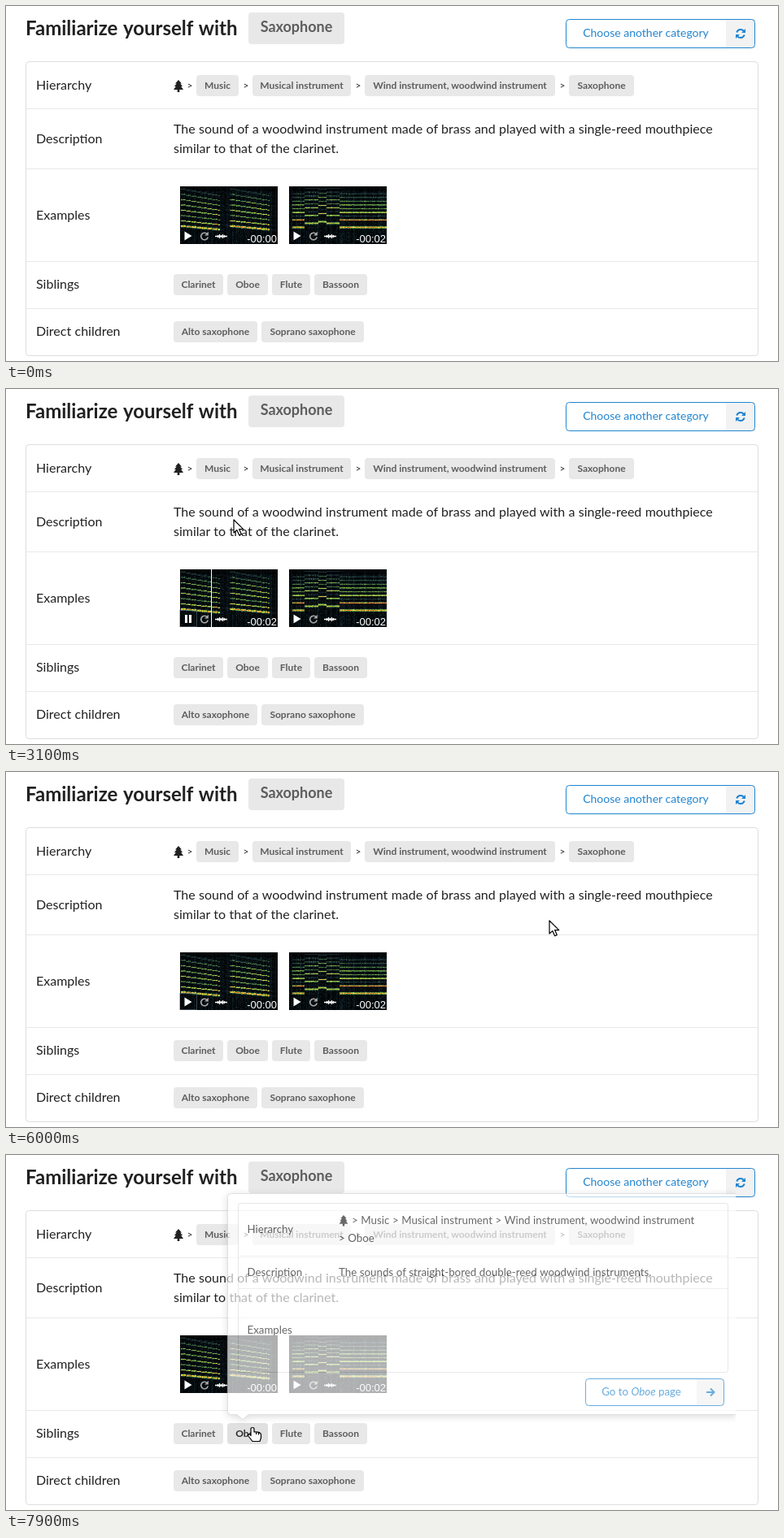
Animation of 949 by 437 pixels, one loop 8 s. Source, as an HTML page with a canvas:

```html
<!DOCTYPE html>
<html lang="en">
<head>
<meta charset="utf-8">
<title>Category page</title>
<style>
  html, body { margin: 0; width: 100%; height: 100%; overflow: hidden; background: #fff; }
  canvas, svg { position: absolute; left: 0; top: 0; }
  svg { font: 16px Lato, sans-serif; fill: #212121; }
  .prose { word-spacing: .016em; }
  .title { font-size: 24px; font-weight: 700; word-spacing: .06em; }
  .pill rect { fill: #e8e8e8; }
  .pill text { font-weight: 700; text-anchor: middle; fill: #000; fill-opacity: .6; }
  .pill.hover rect { fill: #e0e0e0; }
  .pill.hover text { fill-opacity: .8; }
  .sep { font-size: 12px; text-anchor: middle; }
  .line { fill: none; stroke: #222426; stroke-opacity: .15; }
  .rule { fill: none; stroke: #222426; stroke-opacity: .1; }
  .button { fill: #2185d0; text-anchor: middle; }
  .outline { fill: none; stroke: #2185d0; }
  .time { font: 13px "Liberation Sans", Arial, sans-serif; fill: #fff; text-anchor: end; }
  #popup { font-size: 13.3px; opacity: .68; }
  #popupBody { fill: #fff; stroke: #d4d4d5; filter: drop-shadow(0 2px 4px rgba(34, 36, 38, .25)); }
  #cursor path { fill: #fff; stroke: #000; stroke-width: 1.2; stroke-linejoin: round; }
</style>
</head>
<body>
<canvas id="thumbs" width="949" height="437"></canvas>
<svg id="stage" width="949" height="437" viewBox="0 0 949 437"></svg>
<script>
const LOOP = 8000;
const STEP = 100;
const THUMB = { y: 222, w: 120, h: 71, first: 214, second: 348 };

// Labels: text, left, right, top
const labels = [
  ['Music', 234, 286, 85], ['Musical instrument', 303, 424, 85],
  ['Wind instrument, woodwind instrument', 441, 675, 85], ['Saxophone', 692, 772, 85],
  ['Clarinet', 206, 267, 330], ['Oboe', 272, 322, 330], ['Flute', 327, 374, 330], ['Bassoon', 379, 444, 330],
  ['Alto saxophone', 206, 309, 388], ['Soprano saxophone', 314, 440, 388]
];

const text = (x, y, content, cls = 'prose') => `<text x="${x}" y="${y}" class="${cls}">${content}</text>`;

const pill = (content, left, right, top, height = 26, size = 12, drop = 17) =>
  `<g class="pill"><rect x="${left}" y="${top}" width="${right - left}" height="${height}" rx="4"/>
   <text x="${(left + right) / 2}" y="${top + drop}" font-size="${size}">${content}</text></g>`;

const tree = (x, y, scale = 1) =>
  `<path transform="translate(${x} ${y}) scale(${scale})"
    d="M0 0 L4 4.5 H2.3 L5 8 H3.2 L6 12 H1.3 V15 H-1.3 V12 H-6 L-3.2 8 H-5 L-2.3 4.5 H-4Z"/>`;

const outlineButton = (x, y, w, h, pane) =>
  `<rect x="${pane}" y="${y}" width="${x + w - pane}" height="${h}" fill="#f2f2f2"/>
   <rect x="${x}" y="${y}" width="${w}" height="${h}" rx="4" class="outline"/>`;

const controls = (left, id) =>
  `<g transform="translate(${left} ${THUMB.y})">
    <path id="${id}Icon" fill="#fff" d="${icons.play}"/>
    <path d="M33.2 58.6 A4.3 4.3 0 1 0 34.2 62.5" fill="none" stroke="#aaa" stroke-width="1.6"/>
    <path d="M34.8 55.8 V60.5 H30.2Z" fill="#aaa"/>
    <path d="M43 61.5 H58 M46.5 60 V63 M48.5 59 V64 M50.5 60 V63 M52.5 59 V64 M54.5 60 V63" stroke="#fff" stroke-width="1.3"/>
    <text id="${id}Time" x="119" y="69" class="time">-00:02</text>
  </g>`;

const icons = {
  play: 'M5.5 55.5 L14.5 61 L5.5 66.5Z',
  pause: 'M6 56 H9 V66 H6Z M11 56 H14 V66 H11Z'
};

const cursors = {
  arrow: 'M0 0 V16 L3.8 12.6 L6.6 18.8 L9.3 17.6 L6.6 11.6 H11.8Z',
  hand: 'M-2 1.5 Q-2 -.5 0 -.5 T2 1.5 V5 Q9.5 4.5 10.5 8 V12 L9 16.5 H0 L-5.5 9.5 Q-5 7 -3.2 8 L-2 9.5Z M4.6 5.4 V8 M7.5 6 V8.5',
  beam: 'M-3 -7 H-1 L0 -6 L1 -7 H3 V-5.4 H.8 V5.4 H3 V7 H1 L0 6 L-1 7 H-3 V5.4 H-.8 V-5.4 H-3Z'
};

const popup = `
  <g id="popup" clip-path="url(#pageEdge)">
    <path id="popupBody" d="M897 47.5 H276.5 q-4 0 -4 4 V315.5 q0 4 4 4 H284 l7 6 7 -6 H897"/>
    <rect x="285.5" y="59.5" width="602" height="208" rx="3" class="line"/>
    <path d="M286 124.5 H887 M286 164.5 H887" class="rule"/>
    ${text(296.5, 96, 'Hierarchy')}${text(296.5, 149, 'Description')}${text(296.5, 220, 'Examples')}
    ${tree(415, 74, .9)}
    ${text(425, 85, '&gt; Music &gt; Musical instrument &gt; Wind instrument, woodwind instrument')}
    ${text(409, 107, '&gt; Oboe')}
    ${text(409, 149, 'The sounds of straight-bored double-reed woodwind instruments.')}
    ${outlineButton(712.5, 275.5, 170, 33, 849)}
    ${text(781, 296, 'Go to <tspan font-style="italic">Oboe</tspan> page', 'button')}
    <path d="M861 292 H870 M866 287.5 L870.5 292 L866 296.5" fill="none" stroke="#2185d0" stroke-width="2"/>
  </g>`;

const stage = document.getElementById('stage');
stage.innerHTML = `
  <clipPath id="pageEdge"><rect width="897" height="437"/></clipPath>
  ${text(24, 36, 'Familiarize yourself with', 'title')}
  ${pill('Saxophone', 298, 416, 8, 39, 18, 24)}
  ${outlineButton(688.5, 16.5, 232, 35, 885)}
  <text x="786.5" y="38" class="button" font-size="14">Choose another category</text>
  <path d="M898.3 32.5 A5 5 0 0 1 907 30.8 M907.7 35.5 A5 5 0 0 1 899 37.2" fill="none" stroke="#2185d0" stroke-width="2"/>
  <path d="M909 28 V33 H904Z M897 40 V35 H902Z" fill="#2185d0"/>
  <rect x="24.5" y="68.5" width="900" height="362" rx="4" class="line"/>
  <path d="M25 126.5 H924 M25 200.5 H924 M25 314.5 H924 M25 372.5 H924" class="rule"/>
  ${text(37, 103, 'Hierarchy')}${text(37, 169, 'Description')}${text(37, 263, 'Examples')}
  ${text(37, 348, 'Siblings')}${text(37, 406, 'Direct children')}
  ${text(206, 157, 'The sound of a woodwind instrument made of brass and played with a single-reed mouthpiece')}
  ${text(206, 181, 'similar to that of the clarinet.')}
  ${tree(212, 91)}
  ${[226, 295, 433, 684].map(x => text(x, 102, '&gt;', 'sep')).join('')}
  <g id="labels">${labels.map(label => pill(...label)).join('')}</g>
  <path id="playhead" d="M0 222 V293" stroke="#fff"/>
  <rect id="focus" x="213.5" y="272.5" width="21" height="20" fill="none" stroke="#6f7f95" stroke-dasharray="1 1"/>
  ${controls(THUMB.first, 'first')}${controls(THUMB.second, 'second')}
  ${popup}
  <g id="cursor"><path/></g>`;

// Spectrogram thumbnails: harmonics stacked above a moving lowest line.
function randomFrom(seed) {
  return () => (seed = (seed * 16807) % 2147483647) / 2147483647;
}

function heat(value) {
  const ramp = [[0, 0, 0], [22, 42, 52], [95, 150, 60], [222, 222, 70], [235, 85, 25]];
  const pos = Math.min(Math.max(value, 0), .999) * (ramp.length - 1);
  const i = Math.floor(pos);
  return ramp[i].map((c, n) => c + (ramp[i + 1][n] - c) * (pos - i));
}

function drawSpectrogram(left, seed, weights, noteAt) {
  const { w, h, y: top } = THUMB;
  const random = randomFrom(seed);
  const ctx = document.getElementById('thumbs').getContext('2d');
  const image = ctx.createImageData(w, h);
  for (let x = 0; x < w; x++) {
    const { low, gap, gain } = noteAt(x);
    const streak = .04 + .2 * random();
    for (let y = 0; y < h; y++) {
      const k = (low - y) / gap;
      const harmonic = Math.round(k);
      const distance = (k - harmonic) * gap;
      const width = harmonic === 0 ? 1.6 : .6;
      const line = (weights[harmonic] || 0) * gain * Math.exp(-distance * distance / width);
      const noise = streak * random() * (y < 6 ? .5 : 1);
      image.data.set([...heat(line * (.75 + .35 * random()) + noise), 255], (y * w + x) * 4);
    }
  }
  ctx.putImageData(image, left, top);
}

drawSpectrogram(THUMB.first, 71, [.9, .78, .5, .66, .6, .5, .38, .28], x => {
  const start = x < 55 ? 0 : 61;
  const inside = (x >= 1 && x < 49) || (x >= 61 && x < 110);
  const note = Math.floor((x - start) / 6.5);
  return { low: 48.5 + note * .6, gap: 6.5 - note * .08, gain: inside ? ((x - start) % 6.5 < 1 ? .6 : 1) : .1 };
});

drawSpectrogram(THUMB.second, 29, [.85, .05, .95, .2, .8, .45, .6, .4, .3, .25], x => {
  const high = x >= 19 && x < 62;
  const peak = x >= 36 && x < 46;
  return { low: peak ? 43 : high ? 45 : 50, gap: peak ? 5 : high ? 4.8 : 4.6, gain: x < 4 ? .1 : high ? .8 : 1 };
});

// Pointer path: time, x, y
const path = [
  [300, 420, 426], [1100, 243, 314], [1300, 220, 293], [1400, 217, 280], [1600, 216, 285], [1900, 216, 285],
  [2600, 262, 186], [2700, 262, 186], [3100, 280, 161], [3600, 398, 154], [4300, 599, 157], [5000, 731, 162],
  [5800, 731, 162], [6700, 447, 258], [7400, 303, 336]
];

function pointerAt(t) {
  const next = path.findIndex(key => key[0] > t);
  if (next < 0) return path[path.length - 1].slice(1);
  const [t0, x0, y0] = path[next - 1];
  const [t1, x1, y1] = path[next];
  const p = (t - t0) / (t1 - t0);
  return [x0 + (x1 - x0) * p, y0 + (y1 - y0) * p].map(Math.round);
}

const within = (x, y, left, right, top, bottom) => x >= left && x < right && y >= top && y < bottom;
const el = id => document.getElementById(id);
const show = (id, on) => el(id).setAttribute('visibility', on ? 'visible' : 'hidden');

function drawPointer(t) {
  const visible = t >= path[0][0];
  show('cursor', visible);
  const [x, y] = visible ? pointerAt(t) : [-1, -1];
  const hovered = labels.findIndex(([, left, right, top]) => within(x, y, left, right, top, top + 26));
  [...el('labels').children].forEach((label, i) => label.classList.toggle('hover', i === hovered));
  const onPlay = within(x, y, 214, 234, 272, 293);
  const onText = within(x, y, 206, 868, 143, 161) || within(x, y, 206, 411, 167, 185);
  const shape = hovered >= 0 || onPlay ? 'hand' : onText ? 'beam' : 'arrow';
  el('cursor').setAttribute('transform', `translate(${x} ${y})`);
  el('cursor').firstChild.setAttribute('d', cursors[shape]);
}

// The playhead advances in coarse ticks, as media time updates do.
function drawPlayer(t) {
  const start = 1700, tick = 430, tickWidth = 16.7, duration = 3.06;
  const playing = t >= start && t < 5400;
  const travelled = Math.min(Math.max(Math.floor((t - start) / tick) * tickWidth - 11.7, 0), 117);
  const remaining = playing ? Math.min(2, Math.floor(duration * (1 - travelled / 119))) : 0;
  show('playhead', playing);
  show('focus', t >= start && t < 7700);
  el('playhead').setAttribute('transform', `translate(${Math.floor(THUMB.first + travelled) + .5} 0)`);
  el('firstIcon').setAttribute('d', playing ? icons.pause : icons.play);
  el('firstTime').textContent = `-00:0${remaining}`;
}

function frame(now) {
  const t = Math.floor((now % LOOP) / STEP) * STEP;
  drawPointer(t);
  drawPlayer(t);
  show('popup', t >= 7900);
  requestAnimationFrame(frame);
}
requestAnimationFrame(frame);
</script>
</body>
</html>
```
